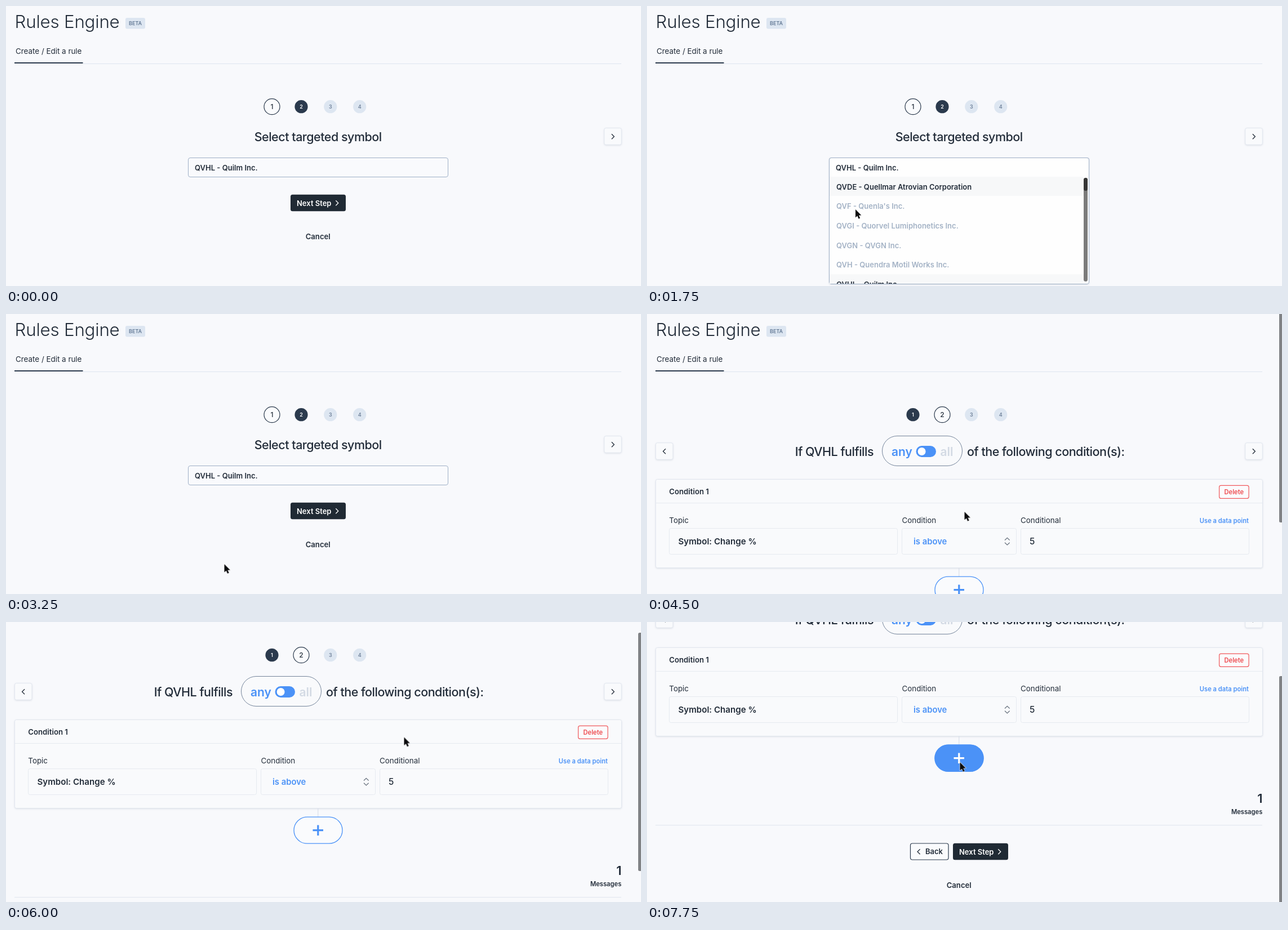
Write an HTML page that moves like this. It is 1127 px wide and 497 px high and loops after 8 s.

```html
<!DOCTYPE html>
<html lang="en">
<head>
<meta charset="utf-8">
<title>Rules Engine</title>
<style>
  html, body { margin: 0; width: 100%; height: 100%; overflow: hidden; background: #f8f9fc; }
  svg { display: block; width: 1127px; height: 497px; font-family: Inter, Roboto, sans-serif; }
  text { white-space: pre; }
  .soft { filter: drop-shadow(0 1px 1.5px rgba(50, 70, 100, .13)); }
</style>
</head>
<body>
<svg id="stage" viewBox="0 0 1127 497"></svg>
<script>
const INK = '#222c39', NAVY = '#2b3a4d', BLUE = '#4b92f7', EDGE = '#e1e6ee', PALE = '#dde6f1';
const SYMBOL = 'QVHL', PICK = SYMBOL + ' - Quilm Inc.';
const LOOP = 8000;

const text = (x, y, size, weight, str, { fill = INK, anchor = 'start', gap = 0 } = {}) =>
  `<text x="${x}" y="${y}" font-size="${size}" font-weight="${weight}" fill="${fill}"
    text-anchor="${anchor}" letter-spacing="${gap}">${str}</text>`;

const box = (x, y, w, h, r, fill, stroke = 'none', extra = '') =>
  `<rect x="${x}" y="${y}" width="${w}" height="${h}" rx="${r}" fill="${fill}" stroke="${stroke}" ${extra}/>`;

const line = (d, stroke, width = 1) =>
  `<path d="${d}" fill="none" stroke="${stroke}" stroke-width="${width}"/>`;

const chevron = (x, y, dir, stroke = INK, s = 4.5) =>
  line(`M${x - dir * s / 2} ${y - s}l${dir * s} ${s}l${-dir * s} ${s}`, stroke, 1.3);

const group = (id, body, attrs = '') => `<g id="${id}" ${attrs}>${body}</g>`;

const title = (x, y, str, anchor = 'start') => text(x, y, 21.5, 500, str, { anchor, gap: -.5 });

const navBox = (x, y, dir) =>
  box(x, y, 30.5, 29.5, 3, '#f9fafc', EDGE, 'class="soft"') + chevron(x + 15.3, y + 15, dir);

function steps(current) {
  return [472, 524, 575.8, 627.7].map((x, i) => {
    const n = i + 1, on = n === current, dark = n < 3;
    const dot = on
      ? `<circle cx="${x}" cy="178.7" r="14" fill="#fafbfd" stroke="${NAVY}" stroke-width="1.2"/>`
      : `<circle cx="${x}" cy="178.7" r="11.6" fill="${dark ? NAVY : PALE}"/>`;
    const fill = on ? INK : dark ? '#fff' : '#71839b';
    return dot + text(x, on ? 183 : 182, on ? 12 : 9, on ? 500 : 600, n, { fill, anchor: 'middle' });
  }).join('');
}

const nextButton = (x, y) =>
  box(x, y, 98, 29.5, 3.5, '#202a34') +
  text(x + 11, y + 19.7, 13, 600, 'Next Step', { fill: '#fff' }) +
  chevron(x + 82.5, y + 15, 1, '#fff');

const cancel = y => text(553.7, y, 13.1, 600, 'Cancel', { anchor: 'middle' });

const header =
  text(15.5, 39, 31.3, 300, 'Rules Engine', { gap: -.2 }) +
  box(212, 21, 35, 19.5, 3, PALE) +
  text(229.6, 34.2, 9, 600, 'BETA', { fill: '#647a96', anchor: 'middle' }) +
  text(17, 85, 13.4, 400, 'Create / Edit a rule') +
  line('M137 102.5H1092', '#dfe5f0') + line('M15 101H136.5', NAVY, 2);

function menu() {
  const rows = [
    ['QVDE - Quellmar Atrovian Corporation', 1],
    ["QVF - Quenla's Inc."],
    ['QVGI - Quorvel Lumiphonetics Inc.'],
    ['QVGN - QVGN Inc.'],
    ['QVH - Quendra Motil Works Inc.'],
    [PICK, 1],
    ['QVHT - Quombra Estates Inc.'],
    ['QVJ - Quistane Mineral Inc.']
  ];
  const list = rows.map(([name, live], i) => {
    const y = 303 + i * 34.65;
    return (live ? box(324, y, 451, 34.2, 0, '#f7f8f9') : '') +
      text(336, y + 22.7, 13, 600, name, { fill: live ? INK : '#a3b2c5' });
  }).join('');
  return box(323.5, 269.5, 461, 224, 3.5, '#fefefe', '#9fb0c6', 'class="soft"') +
    text(335, 291.5, 13, 600, PICK) +
    `<g clip-path="url(#window)">${group('list', list)}</g>` +
    box(775, 305, 7, 184, 3.5, '#7b7b7b') + group('thumb', box(775, 305, 7, 23, 3.5, '#363636'));
}

const pageOne = steps(1) +
  title(553.7, 239.5, 'Select targeted symbol', 'middle') +
  navBox(1061.8, 216.7, 1) +
  box(323.5, 269.5, 461, 34, 3.5, '#f9fafd', '#9fb0c6') +
  text(335, 291.5, 13, 600, PICK) +
  nextButton(505, 334.8) + cancel(414.3) + group('menu', menu());

const field = (x, w) => box(x, 380.5, w, 46, 3, '#f9fafc', '#e6eaf0');
const label = (x, str) => text(x, 371.2, 13.4, 400, str);
const plus = (fill, ink) =>
  box(511, 466.2, 86, 47, 23.5, fill, BLUE, 'stroke-width="1.3"') + line('M544.5 489.7H563M553.8 480.5V499', ink, 3.2);

const pageTwo = steps(2) +
  navBox(15.5, 228.7, -1) + navBox(1061.8, 228.7, 1) +
  title(402, 251.5, `If ${SYMBOL} fulfills`, 'end') +
  box(417.5, 216.5, 142, 53, 26.5, '#f9fafc', '#74849a') +
  text(434, 251.5, 21, 600, 'any', { fill: BLUE }) +
  box(477.5, 234, 35.5, 20, 10, BLUE) + '<circle cx="487.6" cy="244" r="7" fill="#fff"/>' +
  text(520.5, 251.5, 21, 600, 'all', { fill: '#d3dae4' }) +
  title(568, 251.5, 'of the following condition(s):') +
  box(15.5, 293.5, 1077, 157, 3, '#f9fafc', EDGE, 'class="soft"') +
  line('M16 335.5H1092', '#e6eaf0') +
  text(39.3, 319.5, 13.2, 600, 'Condition 1') +
  box(1015.6, 304.3, 52.5, 23, 3, '#fbfbfd', '#f0595c', 'stroke-width="1.2"') +
  text(1041.8, 319.8, 11.1, 600, 'Delete', { fill: '#ee4a4e', anchor: 'middle' }) +
  label(39.3, 'Topic') + label(452.5, 'Condition') + label(663, 'Conditional') +
  text(1068, 371, 11.2, 600, 'Use a data point', { fill: BLUE, anchor: 'end' }) +
  field(39.5, 405) + field(452.5, 203) + field(663.5, 405) +
  text(55.5, 409.2, 15.1, 600, 'Symbol: Change %') +
  text(473, 409.2, 14.8, 600, 'is above', { fill: BLUE }) +
  line('M635 401.5l4.3 -4.2l4.3 4.2M635 405.8l4.3 4.2l4.3 -4.2', '#66707d', 1.2) +
  text(679, 409.2, 15.5, 500, '5') +
  line('M553.8 451V466', '#d3dbe6') +
  plus('#fafbfd', BLUE) + group('plusOn', plus(BLUE, '#fff')) +
  text(1092.5, 569, 22, 600, '1', { anchor: 'end' }) +
  text(1092.3, 589, 11.2, 600, 'Messages', { anchor: 'end' }) +
  line('M15 608.7H1092', '#dfe5ee') +
  box(467.5, 641, 67.5, 29, 3.5, '#fafbfd', NAVY, 'stroke-width="1.2"') +
  chevron(482.3, 655.7, -1) + text(494, 660.4, 13, 600, 'Back') +
  nextButton(543, 640.8) + cancel(720.3);

const arrow = '<path d="M0 0V14.6L3.3 11.5L5.6 16.7L8.2 15.6L6 10.5H10.4Z" fill="#0b0b0d" ' +
  'stroke="#fff" stroke-width="1.1" stroke-linejoin="round" paint-order="stroke"/>';

document.getElementById('stage').innerHTML =
  '<defs><clipPath id="window"><rect x="324" y="303" width="460" height="190"/></clipPath></defs>' +
  group('scroll', header + group('one', pageOne) + group('two', pageTwo)) +
  group('bar', box(1122, -53, 7, 423, 2.5, '#808285')) +
  group('cursor', arrow);

// Each track holds its value until the next listed time.
function track(id, prop, table, format = v => v) {
  const frames = table.map(([t, ...v]) => ({ offset: t / LOOP, [prop]: format(...v), easing: 'step-end' }));
  frames.push({ ...frames[frames.length - 1], offset: 1 });
  document.getElementById(id).animate(frames, { duration: LOOP, iterations: Infinity });
}
const move = (x, y) => `translate(${x}px, ${y}px)`;
const rise = y => move(0, -y);

track('cursor', 'transform', [
  [0, -40, -40], [250, 410, 470], [500, 398, 372], [750, 372, 278], [1750, 370, 361],
  [2250, 374, 392], [2500, 387.5, 444], [3750, 563.5, 351], [5000, 640, 262],
  [5250, 706.5, 204.5], [7250, 640, 226], [7500, 555.5, 249]
], move);

track('menu', 'opacity', [[0, 0], [1000, .5], [1250, 1], [3000, .4], [3250, 0]]);
const listScroll = [[0, 0], [2000, 10], [2250, 28], [2500, 38], [2750, 40]];
track('list', 'transform', listScroll, rise);
track('thumb', 'transform', listScroll, y => move(0, y * .12));

track('one', 'opacity', [[0, 1], [4000, .5], [4250, 0]]);
track('two', 'opacity', [[0, 0], [4250, .5], [4500, 1]]);
track('plusOn', 'opacity', [[0, 0], [7500, .5], [7750, 1]]);

const pageScroll = [[0, 0], [6000, 120], [6750, 242], [7000, 247], [7250, 248]];
track('scroll', 'transform', pageScroll, rise);
track('bar', 'transform', pageScroll, y => move(0, y * .6));
track('bar', 'opacity', [[0, 0], [4250, 1], [5000, .5], [5250, 0], [6000, 1]]);
</script>
</body>
</html>
```
